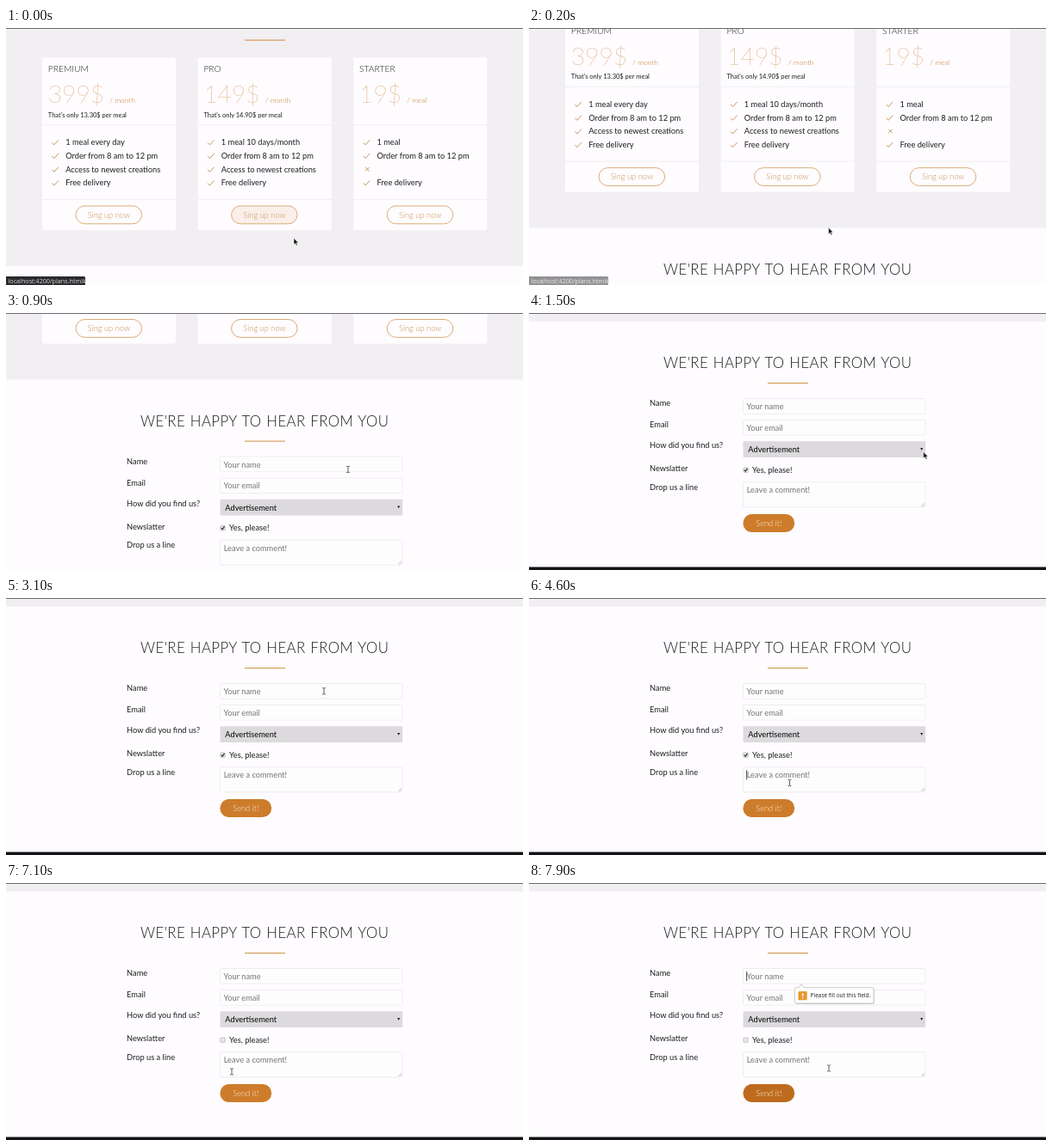
An HTML page for the animation above (8 s loop, 600 by 299 pixels).

```html
<!DOCTYPE html>
<html lang="en">
<head>
<meta charset="utf-8">
<title>Plans and contact form</title>
<style>
  html, body { margin: 0; width: 100%; height: 100%; overflow: hidden; background: #fefcfe; }
  svg { display: block; width: 100vw; height: 100vh; }
  text { font: 400 9.28px Lato, sans-serif; fill: #1e1d20; }
  .title { font-weight: 300; font-size: 16.8px; letter-spacing: .39px; word-spacing: .9px; text-anchor: middle; }
  .plan { font-weight: 300; font-size: 10.31px; }
  .price { font-weight: 100; font-size: 28.125px; fill: #c9782c; }
  .unit { font-weight: 300; font-size: 8.44px; }
  .note { font-size: 7.5px; }
  .btn { font-weight: 300; text-anchor: middle; fill: #cb9157; }
  .send { fill: #fbeedd; }
  .hint { fill: #757575; }
  .pick { fill: #050505; }
  .small { font: 500 6.5px "Open Sans", sans-serif; }
  .bar { font: 400 7.2px "Open Sans", sans-serif; fill: #dcdcdc; }
  .field { fill: #fefdfe; stroke: #ebe9ec; stroke-width: .8; }
  .mark { fill: none; stroke: #bc8448; stroke-width: .85; }
</style>
</head>
<body>
<svg id="stage" viewBox="0 0 600 299" preserveAspectRatio="none"></svg>
<script>
const NS = "http://www.w3.org/2000/svg";
const stage = document.getElementById("stage");

function el(parent, tag, attrs = {}, content) {
  const node = document.createElementNS(NS, tag);
  for (const key in attrs) node.setAttribute(key, attrs[key]);
  if (content) node.textContent = content;
  return parent.appendChild(node);
}
const group = (p, attrs) => el(p, "g", attrs);
const text = (p, x, y, str, cls = "") => el(p, "text", { x, y, class: cls }, str);
const rect = (p, x, y, width, height, attrs) => el(p, "rect", { x, y, width, height, ...attrs });
const path = (p, d, attrs) => el(p, "path", { d, ...attrs });

const TOP = 267;   // scroll distance between the plans and the form
const LOOP = 8000;
const page = group(stage);

// Page backgrounds
rect(page, 0, -30 - TOP, 600, TOP + 40, { fill: "#f1eff2" });
rect(page, 0, 295.5, 600, 60, { fill: "#141217" });

// Plans
const plans = group(page, { transform: `translate(0 ${-TOP})` });
rect(plans, 277, 13.6, 47, 1, { fill: "#d2853d" });

const FULL = ["Order from 8 am to 12 pm", "Access to newest creations", "Free delivery"];
const PLANS = [
  { x: 42, name: "PREMIUM", price: "399$ ", unit: "/ month", note: "That's only 13.30$ per meal", list: ["1 meal every day", ...FULL] },
  { x: 222.6, name: "PRO", price: "149$ ", unit: "/ month", note: "That's only 14.90$ per meal", list: ["1 meal 10 days/month", ...FULL] },
  { x: 403.3, name: "STARTER", price: "19$ ", unit: "/ meal", note: "", list: ["1 meal", FULL[0], "", FULL[2]] }
];

const hovers = PLANS.map(plan => {
  const card = group(plans, { transform: `translate(${plan.x} 0)` });
  rect(card, 0, 34.2, 155, 201, { rx: 2.3, fill: "#fefcfe" });
  for (const y of [112.5, 199.1]) rect(card, 0, y, 155, .7, { fill: "#eae8eb" });
  text(card, 6.8, 51.2, plan.name, "plan");
  const price = text(card, 6.8, 87, plan.price, "price");
  el(price, "tspan", { class: "unit", dx: -1.7 }, plan.unit);
  text(card, 6.8, 103.7, plan.note, "note");
  plan.list.forEach((item, i) => {
    const y = 136.3 + i * 15.72;
    path(card, item ? `M11.5 ${y - 2.9}l2.4 2.5 5-5.6` : `M13.8 ${y - 5.7}l4.6 4.6m0-4.6l-4.6 4.6`, { class: "mark" });
    text(card, 27.2, y, item);
  });
  const fill = rect(card, 39, 207, 76.5, 20.8, { rx: 10.4, fill: "#d98d45", "fill-opacity": 0, stroke: "#d6a36a", "stroke-width": .9 });
  text(card, 77.4, 220.6, "Sing up now", "btn");
  return fill;
});

// Contact form
text(page, 300.2, 64.2, "WE'RE HAPPY TO HEAR FROM YOU", "title");
rect(page, 277, 81.1, 47, 1, { fill: "#d0903f" });
[["Name", 108.4], ["Email", 133.2], ["How did you find us?", 157.4], ["Newslatter", 184], ["Drop us a line", 205.8]]
  .forEach(([label, y]) => text(page, 140.1, y, label));

for (const [y, h] of [[99.5, 17.7], [124.4, 17.7], [196.8, 29]]) rect(page, 248.5, y, 211.5, h, { rx: 1.4, class: "field" });
text(page, 252.5, 112, "Your name", "hint");
text(page, 252.5, 136.8, "Your email", "hint");
text(page, 252.7, 209.4, "Leave a comment!", "hint");
path(page, "M455.3 224.8l3.6-3.6m-1.7 3.6l1.7-1.7", { stroke: "#8d8b8d", "stroke-width": .5 });

rect(page, 248.5, 149.3, 211.7, 18.7, { rx: 1, fill: "#dcdadd" });
text(page, 254.3, 162, "Advertisement", "pick");
path(page, "M454.2 157h3l-1.5 2.8z", { fill: "#111" });

rect(page, 248.8, 180, 5.4, 5.4, { rx: .8, fill: "#e9e8e9", stroke: "#a5a3a6", "stroke-width": .6 });
const tick = path(page, "M249.8 182.6l1.4 1.5 2.3-3.2", { fill: "none", stroke: "#222", "stroke-width": 1.1 });
text(page, 259, 185.6, "Yes, please!");

const send = rect(page, 248.4, 234, 59.8, 21, { rx: 10.5 });
text(page, 278.3, 247.8, "Send it!", "btn send");

// Text caret, one place per field
const caret = rect(page, 252.3, 0, .8, 11, { fill: "#222" });

// Validation bubble
const bubble = group(page);
const SHAPE = "M310 121.7h3l3-3.9 3 3.9h79.5q1.5 0 1.5 1.5v15.3q0 1.5-1.5 1.5h-88.5q-1.5 0-1.5-1.5v-15.3q0-1.5 1.5-1.5z";
path(bubble, SHAPE, { fill: "#000", opacity: .16, transform: "translate(.7 1.1)" });
path(bubble, SHAPE, { fill: "#fff", stroke: "#b5b3b5", "stroke-width": .7 });
rect(bubble, 312.5, 126, 10.2, 10.2, { rx: 1, fill: "#e5982f" });
path(bubble, "M317.6 127.9v4m0 1.1v1.3", { stroke: "#fff", "stroke-width": 1.3 });
text(bubble, 326.6, 133, "Please fill out this field.", "small");

// Browser edges
rect(stage, 0, 0, 600, 1, { fill: "#6b696d" });
const status = group(stage);
path(status, "M0 289h90.5q1.5 0 1.5 1.5V299H0z", { fill: "#2c2a2e" });
text(status, 2.5, 296.5, "localhost:4200/plans.html#", "bar");

// Pointers, hot spot at 0,0
const pointers = {
  arrow: path(stage, "M0 0v7.4l1.7-1.5 1.2 2.7 1.3-.6-1.2-2.6h2.3z", { fill: "#111", stroke: "#fff", "stroke-width": .5 }),
  beam: path(stage, "M-1.9-3.7q1.9 0 1.9.8v5.8q0 .8-1.9.8M1.9-3.7q-1.9 0-1.9.8M0 2.9q0 .8 1.9.8", { fill: "none", stroke: "#333", "stroke-width": .8 }),
  hand: path(stage, "M-.8 0q.8-.8 1.6 0v3l3.2.8q.9.3.8 1.3l-.7 3.4h-4.2l-2.8-3.3q.3-1 1.4-.3l.7.6z", { fill: "#111", stroke: "#fff", "stroke-width": .5 })
};

// time, x, y, pointer shape from then on
const MOVES = [
  [0, 334, 244.5, "arrow"], [500, 368, 214, "arrow"], [900, 397, 182, "beam"],
  [1200, 432, 168, "arrow"], [1700, 475, 157.5, "arrow"], [2100, 475, 157.5, "arrow"],
  [2200, 475.4, 159.2, "arrow"], [2500, 475.4, 159.2, "arrow"], [2600, 476, 160, "arrow"],
  [2700, 476, 160, "arrow"], [3000, 385, 112, "beam"], [3100, 369, 108.3, "beam"],
  [3300, 369, 108.3, "beam"], [3700, 345, 134, "beam"], [3900, 328, 158, "arrow"],
  [4100, 312, 210, "beam"], [4300, 302.5, 215, "beam"], [4600, 302.5, 215, "beam"],
  [4800, 285, 243, "hand"], [4900, 286, 238, "hand"], [5000, 290, 204, "beam"],
  [5100, 288, 181, "arrow"], [5500, 288, 181, "arrow"], [5700, 262, 188, "arrow"],
  [5800, 249, 187.5, "arrow"], [5900, 249, 187.5, "arrow"], [6100, 251, 186, "arrow"],
  [6300, 251, 186, "arrow"], [6500, 250.5, 185, "arrow"], [6600, 250.5, 185, "arrow"],
  [6700, 250.8, 182.5, "arrow"], [6900, 251, 183, "arrow"], [7000, 256, 201, "beam"],
  [7200, 268, 238, "hand"], [7500, 283, 244, "hand"], [7600, 284, 244, "hand"],
  [7700, 294, 239, "hand"], [7800, 320, 226, "beam"], [7900, 348, 215.5, "beam"]
];

// from, to, caret top
const CARETS = [[3300, 3700, 103], [3800, 4200, 127.8], [4300, 5100, 200.3], [7700, 8000, 103]];

const clamp = v => Math.max(0, Math.min(1, v));
const show = (node, on) => node.setAttribute("visibility", on ? "visible" : "hidden");
const mix = (a, b, k) => `rgb(${a.map((v, i) => Math.round(v + (b[i] - v) * k))})`;

// Steady wheel scroll, then a soft stop
function scrollAt(t) {
  if (t < 900) return TOP - t * (TOP - 67.5) / 900;
  return 67.5 * (1 - clamp((t - 900) / 608)) ** 2;
}

function pointerAt(t) {
  let i = MOVES.length - 1;
  while (MOVES[i][0] > t) i--;
  const a = MOVES[i], b = MOVES[i + 1] || a;
  const k = b === a ? 0 : (t - a[0]) / (b[0] - a[0]);
  return { x: a[1] + (b[1] - a[1]) * k, y: a[2] + (b[2] - a[2]) * k, kind: a[3] };
}

function draw(t) {
  page.setAttribute("transform", `translate(0 ${scrollAt(t)})`);
  status.setAttribute("opacity", 1 - clamp((t - 100) / 200));
  hovers[1].setAttribute("fill-opacity", .11 * (1 - clamp(t / 200)));

  const glow = t < 6000 ? clamp((t - 4700) / 100) * clamp((5100 - t) / 200) : clamp((t - 7100) / 200);
  send.setAttribute("fill", mix([205, 124, 43], [190, 107, 31], glow));
  show(tick, t < 6700);
  show(bubble, t >= 7700);

  const spot = CARETS.find(([from, to]) => t >= from && t < to);
  show(caret, spot);
  if (spot) caret.setAttribute("y", spot[2]);

  const { x, y, kind } = pointerAt(t);
  for (const name in pointers) show(pointers[name], name === kind);
  pointers[kind].setAttribute("transform", `translate(${x} ${y})`);
}

const start = performance.now();
function tickFrame() {
  const t = Math.max(0, performance.now() - start) % LOOP;
  draw(Math.floor(t / 100) * 100);
  requestAnimationFrame(tickFrame);
}
draw(0);
requestAnimationFrame(tickFrame);
</script>
</body>
</html>
```
